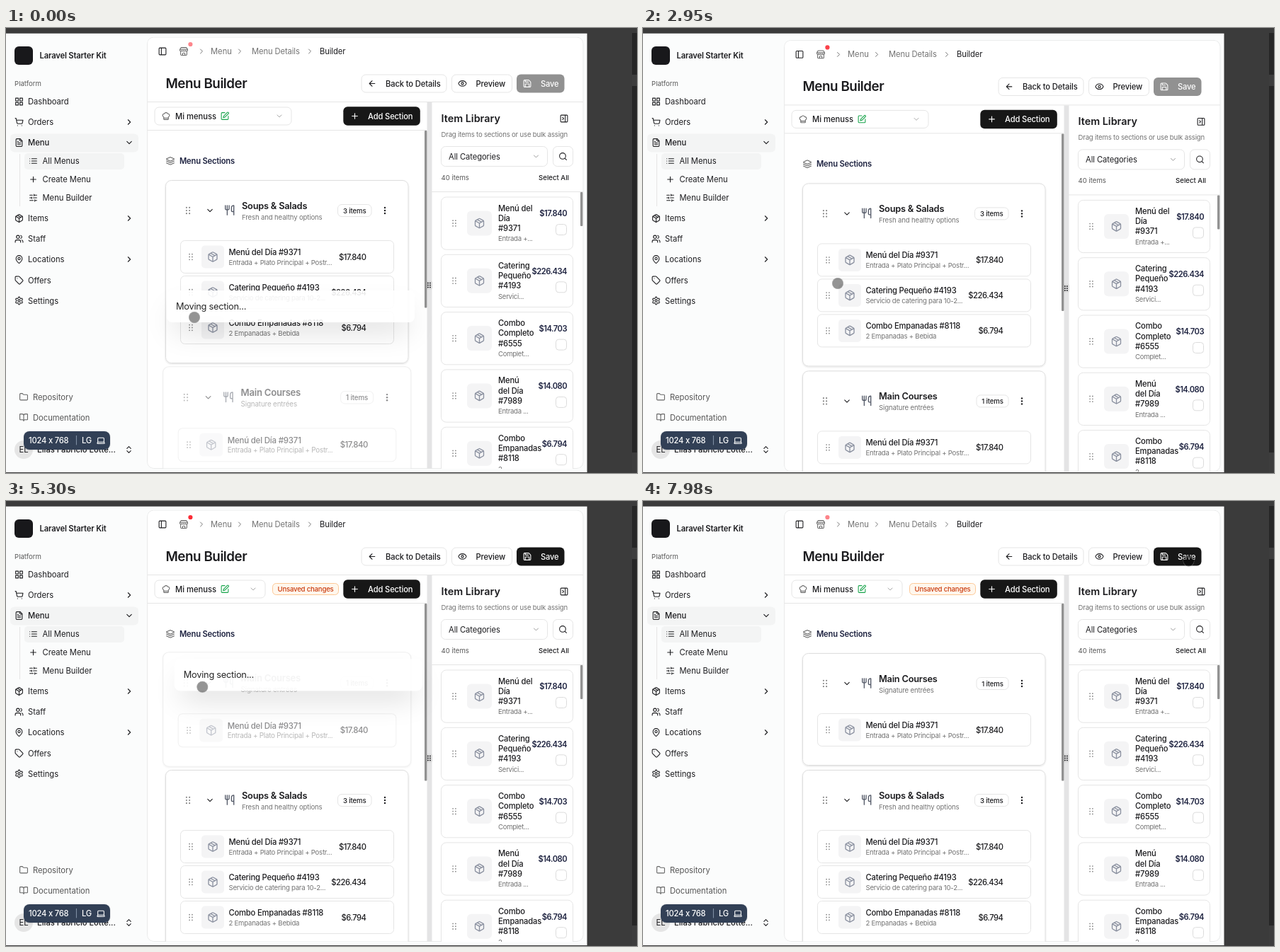
Animation, 891 px wide and 629 px high, one loop 8000 ms. Source, as an HTML page:

```html
<!DOCTYPE html>
<html lang="en">
<head>
<meta charset="utf-8">
<title>Menu Builder</title>
<style>
html, body { margin: 0; width: 100%; height: 100%; overflow: hidden; background: #3b3b3b; }
body { position: relative; font-family: Inter, "Open Sans", sans-serif; }
svg { position: absolute; left: 0; top: 0; display: block; }
text { white-space: pre; }
#overlay, #cursor { position: absolute; left: 0; top: 0; box-sizing: border-box; }
#overlay {
  width: 350px; height: 45px; padding: 0 13px; border-radius: 8px; line-height: 45px;
  font-size: 12.8px; letter-spacing: -.25px; color: #262626;
  background: rgba(255, 255, 255, .9); box-shadow: 0 20px 40px -10px rgba(0, 0, 0, .17);
}
#cursor {
  width: 15px; height: 15px; margin: -7.5px 0 0 -7.5px; border-radius: 50%;
  background: rgba(0, 0, 0, .42); box-shadow: 0 0 0 .5px rgba(120, 120, 120, .7);
}
</style>
</head>
<body>
<svg id="stage" width="891" height="629" viewBox="0 0 891 629"></svg>
<div id="overlay">Moving section...</div>
<div id="cursor"></div>
<script>
const INK = '#1c1c1f', MUTED = '#737373', LINE = '#e5e5e5', NAVY = '#1e2340';
const box = 'M5 3h14a2 2 0 0 1 2 2v14a2 2 0 0 1-2 2H5a2 2 0 0 1-2-2V5a2 2 0 0 1 2-2';
const hole = 'M15 12a3 3 0 1 1-6 0a3 3 0 0 1 6 0';
const ICONS = {
  grid: 'M3 3h7v7H3zM14 3h7v7h-7zM14 14h7v7h-7zM3 14h7v7H3z',
  cart: 'M8 21h.01M19 21h.01M2 2h2l2.7 12.4a2 2 0 0 0 2 1.6h9.8a2 2 0 0 0 2-1.6L22 7H5',
  file: 'M15 2H6a2 2 0 0 0-2 2v16a2 2 0 0 0 2 2h12a2 2 0 0 0 2-2V7zM14 2v4a2 2 0 0 0 2 2h4M10 9H8M16 13H8M16 17H8',
  list: 'M3 6h.01M3 12h.01M3 18h.01M8 6h13M8 12h13M8 18h13',
  plus: 'M5 12h14M12 5v14',
  sliders: 'M21 5h-7M10 5H3M21 12h-9M8 12H3M21 19h-5M12 19H3M14 3v4M8 10v4M16 17v4',
  pack: 'M11 21.7a2 2 0 0 0 2 0l7-4a2 2 0 0 0 1-1.7V8a2 2 0 0 0-1-1.7l-7-4a2 2 0 0 0-2 0l-7 4A2 2 0 0 0 3 8v8a2 2 0 0 0 1 1.7zM12 22V12M3.3 7 12 12l8.7-5M7.5 4.3l9 5.1',
  users: 'M16 21v-2a4 4 0 0 0-4-4H6a4 4 0 0 0-4 4v2M13 7a4 4 0 1 1-8 0a4 4 0 0 1 8 0M22 21v-2a4 4 0 0 0-3-3.9M16 3.1a4 4 0 0 1 0 7.8',
  pin: 'M20 10c0 5-5.5 10.2-7.4 11.8a1 1 0 0 1-1.2 0C9.5 20.2 4 15 4 10a8 8 0 0 1 16 0M15 10a3 3 0 1 1-6 0a3 3 0 0 1 6 0',
  tag: 'M12.6 2.6A2 2 0 0 0 11.2 2H4a2 2 0 0 0-2 2v7.2a2 2 0 0 0 .6 1.4l8.7 8.7a2.4 2.4 0 0 0 3.4 0l6.6-6.6a2.4 2.4 0 0 0 0-3.4zM7.5 7.5h.01',
  gear: hole + 'M12.2 2h-.4a2 2 0 0 0-2 2v.2a2 2 0 0 1-1 1.7l-.4.3a2 2 0 0 1-2 0l-.2-.1a2 2 0 0 0-2.7.7l-.2.4a2 2 0 0 0 .7 2.7l.2.1a2 2 0 0 1 1 1.7v.5a2 2 0 0 1-1 1.8l-.2.1a2 2 0 0 0-.7 2.7l.2.4a2 2 0 0 0 2.7.7l.2-.1a2 2 0 0 1 2 0l.4.3a2 2 0 0 1 1 1.7v.2a2 2 0 0 0 2 2h.4a2 2 0 0 0 2-2v-.2a2 2 0 0 1 1-1.7l.4-.3a2 2 0 0 1 2 0l.2.1a2 2 0 0 0 2.7-.7l.2-.4a2 2 0 0 0-.7-2.7l-.2-.1a2 2 0 0 1-1-1.7v-.5a2 2 0 0 1 1-1.8l.2-.1a2 2 0 0 0 .7-2.7l-.2-.4a2 2 0 0 0-2.7-.7l-.2.1a2 2 0 0 1-2 0l-.4-.3a2 2 0 0 1-1-1.7V4a2 2 0 0 0-2-2z',
  folder: 'M20 20a2 2 0 0 0 2-2V8a2 2 0 0 0-2-2h-7.9a2 2 0 0 1-1.7-.9L9.6 3.9A2 2 0 0 0 7.9 3H4a2 2 0 0 0-2 2v13a2 2 0 0 0 2 2z',
  book: 'M12 7v14M3 18a1 1 0 0 1-1-1V4a1 1 0 0 1 1-1h5a4 4 0 0 1 4 4 4 4 0 0 1 4-4h5a1 1 0 0 1 1 1v13a1 1 0 0 1-1 1h-6a3 3 0 0 0-3 3 3 3 0 0 0-3-3z',
  right: 'm9 18 6-6-6-6',
  down: 'm6 9 6 6 6-6',
  updown: 'm7 15 5 5 5-5M7 9l5-5 5 5',
  panel: box + 'M9 3v18',
  dock: box + 'M15 3v18M8 9l3 3-3 3',
  store: 'M2 7l2.6-4.4A1.2 1.2 0 0 1 6 2h12a1.2 1.2 0 0 1 1.2.6L22 7zM4 12v8a2 2 0 0 0 2 2h12a2 2 0 0 0 2-2v-8M15 22v-4a2 2 0 0 0-2-2h-2a2 2 0 0 0-2 2v4M2 7v3a2.7 2.7 0 0 0 5 0a2.7 2.7 0 0 0 5 0a2.7 2.7 0 0 0 5 0a2.7 2.7 0 0 0 5 0V7',
  back: 'm12 19-7-7 7-7M19 12H5',
  eye: hole + 'M2 12.3a1 1 0 0 1 0-.7 10.8 10.8 0 0 1 20 0 1 1 0 0 1 0 .7 10.8 10.8 0 0 1-20 0',
  save: 'M15.2 3a2 2 0 0 1 1.4.6l3.8 3.8a2 2 0 0 1 .6 1.4V19a2 2 0 0 1-2 2H5a2 2 0 0 1-2-2V5a2 2 0 0 1 2-2zM17 21v-7a1 1 0 0 0-1-1H8a1 1 0 0 0-1 1v7M7 3v4a1 1 0 0 0 1 1h7',
  chef: 'M17 21a1 1 0 0 0 1-1v-5.4c0-.4.3-.8.7-1a4 4 0 0 0-2.1-7.6 5 5 0 0 0-9.2 0 4 4 0 0 0-2.1 7.6c.4.2.7.6.7 1V20a1 1 0 0 0 1 1zM6 17h12',
  edit: 'M12 3H5a2 2 0 0 0-2 2v14a2 2 0 0 0 2 2h14a2 2 0 0 0 2-2v-7M18.4 2.6a2.1 2.1 0 0 1 3 3L12.4 14.6l-4.4 1.4 1.4-4.4z',
  layers: 'M12.8 2.2a2 2 0 0 0-1.6 0L2.6 6.1a1 1 0 0 0 0 1.8l8.6 3.9a2 2 0 0 0 1.6 0l8.6-3.9a1 1 0 0 0 0-1.8zM2 12l9.2 4.2a2 2 0 0 0 1.6 0L22 12M2 17l9.2 4.2a2 2 0 0 0 1.6 0L22 17',
  fork: 'M3 2v7a2 2 0 0 0 2 2h4a2 2 0 0 0 2-2V2M7 2v20M21 15V2a5 5 0 0 0-5 5v6a2 2 0 0 0 2 2h3zm0 0v7',
  search: 'M19 11a8 8 0 1 1-16 0a8 8 0 0 1 16 0M21 21l-4.3-4.3',
  laptop: 'M20 16V7a2 2 0 0 0-2-2H6a2 2 0 0 0-2 2v9m16 0H4m16 0 1.3 2.6a1 1 0 0 1-.9 1.4H3.6a1 1 0 0 1-.9-1.4L4 16'
};

const icon = (name, cx, cy, size = 13, color = INK, w = 2) =>
  `<path d="${ICONS[name]}" transform="translate(${cx - size / 2} ${cy - size / 2}) scale(${size / 24})" fill="none" stroke="${color}" stroke-width="${w}" stroke-linecap="round" stroke-linejoin="round"/>`;
const rect = (x, y, w, h, r, fill, stroke = 'none', extra = '') =>
  `<rect x="${x}" y="${y}" width="${w}" height="${h}" rx="${r}" fill="${fill}" stroke="${stroke}" ${extra}/>`;
const text = (x, y, s, size = 11.2, weight = 400, color = INK, ls = 0, anchor = 'start') =>
  `<text x="${x}" y="${y}" font-size="${size}" font-weight="${weight}" fill="${color}" letter-spacing="${ls}" text-anchor="${anchor}">${s.replace('&', '&amp;')}</text>`;
const small = (x, y, s, ls = -.14) => text(x, y, s, 9.6, 400, MUTED, ls);
const group = (id, body, extra = '') => `<g id="${id}" ${extra}>${body}</g>`;
const grip = (cx, cy, gap = 4, r = 1, color = '#8a8a8a') => {
  let out = '';
  for (let i = 0; i < 6; i++)
    out += `<circle cx="${cx + (i % 2 - .5) * gap}" cy="${cy + ((i >> 1) - 1) * gap}" r="${r}" fill="${color}"/>`;
  return out;
};

function sidebar() {
  const rows = [['grid', 'Dashboard', 104], ['cart', 'Orders', 133, 'right'], ['file', 'Menu', 162, 'down'],
    ['pack', 'Items', 269, 'right'], ['users', 'Staff', 298], ['pin', 'Locations', 327, 'right'],
    ['tag', 'Offers', 356.5], ['gear', 'Settings', 385.5]];
  const subs = [['list', 'All Menus', 188], ['plus', 'Create Menu', 214], ['sliders', 'Menu Builder', 240]];
  return rect(12, 26, 26, 26, 6, '#18181b') +
    text(47.5, 43, 'Laravel Starter Kit', 11.2, 600, INK, -.15) +
    text(12, 81.5, 'Platform', 9.6, 400, '#5a5a5a') +
    rect(6, 149.5, 181, 26, 6, '#f3f4f4') + rect(26, 177, 141, 23, 5, '#f3f4f4') +
    `<path d="M19.5 178V252" stroke="${LINE}"/>` +
    rows.map(([ic, s, y, ch]) => icon(ic, 18.5, y) +
      text(31, y + 4, s, 11.2, s === 'Menu' ? 500 : 400) + (ch ? icon(ch, 174, y) : '')).join('') +
    subs.map(([ic, s, y]) => icon(ic, 38.5, y) + text(51.5, y + 4, s)).join('') +
    icon('folder', 25, 521.5, 13, '#666') + text(38, 525.5, 'Repository', 11.2, 400, '#555') +
    icon('book', 25, 550.5, 13, '#666') + text(38, 554.5, 'Documentation', 11.2, 400, '#555') +
    `<circle cx="25" cy="596" r="13" fill="#e5e5e5"/>` + text(25, 600, 'EL', 11.2, 400, INK, 0, 'middle') +
    text(44, 600, 'Elias Fabricio Lotte...', 11.2, 500) + icon('updown', 173.5, 596) +
    rect(25, 570, 122, 26, 8, '#334056', 'none', 'filter="url(#soft)"') +
    text(32, 587, '1024 x 768', 11.2, 500, '#fff', -.2) + text(97.5, 586.5, '|', 11.2, 400, '#94a3b8') +
    text(107, 587, 'LG', 11.2, 500, '#fff', -.2) + icon('laptop', 134, 583, 13, '#fff');
}

const button = (x, w, ic, s, tx) => rect(x, 66, w, 25, 6, '#fff', LINE) +
  icon(ic, x + 15, 78.5) + text(tx, 82.5, s, 11.2, 500, INK, -.12);

function header() {
  return icon('panel', 221, 33) + icon('store', 251, 33, 13, '#666') +
    `<circle id="dot" cx="260.4" cy="23" r="3.1" fill="#fb2c36"/>` +
    [276, 330, 429].map(x => icon('right', x, 33, 12, '#777')).join('') +
    text(289, 37, 'Menu', 11.2, 400, MUTED) + text(347, 37, 'Menu Details', 11.2, 400, MUTED, -.1) +
    text(443, 37, 'Builder', 11.2, 400, INK, -.1) +
    text(225.5, 85, 'Menu Builder', 18.8, 600, INK, -.45) +
    button(502, 120, 'back', 'Back to Details', 536) + button(629.5, 85, 'eye', 'Preview', 663.5) +
    group('save', rect(721, 65.5, 67.5, 26, 6, '#171717') + icon('save', 736, 78.5, 13, '#fff') +
      text(755, 82.5, 'Save', 11.2, 500, '#fff', -.2)) +
    `<path d="M200 104.5H815M200 144.5H594" stroke="${LINE}"/>`;
}

function toolbar() {
  return rect(210, 112, 193, 25, 6, '#fff', LINE, 'id="picker"') +
    icon('chef', 226, 124.5, 13, '#666') + text(239, 128.5, 'Mi menuss', 11.2, 500) +
    icon('edit', 309, 124.5, 13, '#16a34a') +
    group('arrow', icon('down', 386, 124.5, 12, '#aaa')) +
    group('unsaved', rect(376.5, 116.5, 93, 16, 5, '#fff7ed', '#fdc896') +
      text(383.5, 128, 'Unsaved changes', 9.6, 500, '#ca3a0c', -.2)) +
    rect(476.3, 111.3, 108.5, 26.5, 6, '#171717') + icon('plus', 492.5, 124.5, 13, '#fff') +
    text(511, 128.5, 'Add Section', 11.2, 500, '#fff', -.15);
}

function section(id, title, sub, items) {
  const h = 58.5 + items.length * 50 + 50, bx = items.length > 1 ? 468.5 : 471;
  return group(id, rect(225.5, .5, 342.5, h - .5, 8, '#fff', '#dedede', 'filter="url(#soft)"') +
    grip(257, 43, 4.2, 1.1) + icon('down', 288, 43, 13) + icon('fork', 315.7, 42.5, 16, '#525866') +
    text(333, 41, title, 12.8, 600, INK, -.22) + small(333, 56, sub) +
    rect(bx, 34.5, 516 - bx, 17, 5.5, '#fff', LINE) +
    text((bx + 516) / 2, 46.5, items.length + ' items', 9.6, 500, INK, -.15, 'middle') +
    [-4, 0, 4].map(d => `<circle cx="535" cy="${43 + d}" r="1.2" fill="${INK}"/>`).join('') +
    items.map(([name, desc, price], i) => {
      const y = 108.5 + i * 50;
      return rect(246.5, y - 23, 301, 46, 6, '#fff', LINE) + grip(261, y, 3.8, .9) +
        rect(276, y - 16, 32, 32, 5, '#f4f4f5') + icon('pack', 292, y, 16, '#8b91a0') +
        text(314.5, y - 2.5, name, 11.2, 500, INK, -.18) + small(314.5, y + 11, desc, -.24) +
        text(508.5, y + 4, price, 11.2, 500, INK, -.45, 'end');
    }).join(''));
}

function library() {
  const cards = [['Menú del|Día|#9371', 'Entrada +...', '$17.840'], ['Catering|Pequeño|#4193', 'Servici...', '$226.434'],
    ['Combo|Completo|#6555', 'Complet...', '$14.703'], ['Menú|del Día|#7989', 'Entrada ...', '$14.080'],
    ['Combo|Empanadas|#8118', '2 ...', '$6.794']];
  return rect(594.5, 105, 7, 518, 0, '#e4e4e5') + rect(593.5, 358, 8, 11, 2, '#e5e5e5', '#d6d6d6') +
    grip(597.4, 363.6, 3, 1, INK) + rect(591, 145, 3.4, 250.5, 1, '#929292') +
    text(614.5, 133, 'Item Library', 14.4, 600) + icon('dock', 788, 128, 13) +
    small(614.5, 153.5, 'Drag items to sections or use bulk assign', -.19) +
    rect(614.5, 167.5, 150, 28, 6, '#fff', LINE) + text(625, 185.5, 'All Categories', 11.2, 400, INK, -.08) +
    icon('down', 748.5, 181.5, 12, '#999') +
    rect(772.5, 167.5, 28, 28, 6, '#fff', LINE) + icon('search', 786.5, 181.5) +
    text(614.5, 215, '40 items', 9.6, 400, '#555') + text(795, 215, 'Select All', 9.6, 500, INK, 0, 'end') +
    `<path d="M601 231.5H815" stroke="${LINE}"/>` + rect(811, 232, 3.4, 48, 1, '#929292') +
    cards.map(([name, desc, price], i) => {
      const y = 276 + i * 81.3;
      return rect(614.5, y - 37, 186, 74.2, 7, '#fff', LINE) + grip(633, y, 3.8, .9) +
        rect(651, y - 17.5, 35, 35, 6, '#f4f4f5') + icon('pack', 668.5, y, 16, '#8b91a0') +
        name.split('|').map((s, k) => text(695, y - 17.5 + k * 14.2, s, 11.2, 500, INK, -.15)).join('') +
        small(695, y + 25.3, desc, -.3) + text(792, y - 9.7, price, 11.2, 600, NAVY, -.52, 'end') +
        rect(776.5, y + 1.5, 15, 15, 4, '#fff', '#dcdcdc');
    }).join('');
}

const menu = ['Menú del Día #9371', 'Entrada + Plato Principal + Postr...', '$17.840'];
const $ = id => document.getElementById(id);
$('stage').innerHTML =
  `<defs><clipPath id="pane">${rect(199, 12.5, 617, 610.5, 9, '#fff')}</clipPath>
  <clipPath id="list">${rect(200, 145, 391, 477.5, 0, '#fff')}</clipPath>
  <filter id="soft" x="-5%" y="-5%" width="110%" height="130%"><feDropShadow dx="0" dy="1" stdDeviation="1" flood-opacity=".12"/></filter></defs>` +
  rect(884, 7, 7, 622, 0, '#262626') + rect(884, 66, 7, 16, 0, '#3d3d3d') + rect(884, 600, 7, 29, 0, '#3d3d3d') +
  rect(0, 7.7, 820.5, 620.3, 0, '#fbfcfc') + sidebar() +
  group('main', rect(199.5, 13, 615.5, 609.5, 9, '#fff', '#e9eaea') + header() + toolbar() +
    icon('layers', 232, 188, 13, '#666') + text(245, 192, 'Menu Sections', 11.2, 600, NAVY, -.2) +
    group('cards', section('soups', 'Soups & Salads', 'Fresh and healthy options', [menu,
      ['Catering Pequeño #4193', 'Servicio de catering para 10-2...', '$226.434'],
      ['Combo Empanadas #8118', '2 Empanadas + Bebida', '$6.794']]) +
      section('mains', 'Main Courses', 'Signature entrées', [menu]), 'clip-path="url(#list)"') +
    library(), 'clip-path="url(#pane)"');

// Rows of [ms, x, y]; equal neighbours hold, others ease.
const CURSOR = [[0, 265.5, 408.5], [120, 265.5, 408.5], [560, 272.6, 324], [1599, 272.6, 324], [1600, 278, 260.5],
  [2610, 278, 260.5], [2950, 274.5, 360.5], [3170, 274.5, 360.5], [3550, 252.5, 510.5], [3780, 252, 512],
  [4070, 252, 512], [4370, 259, 432], [4540, 259, 432], [4660, 263, 408], [4930, 276, 262], [5220, 276, 262],
  [6000, 302.5, 271.5], [6250, 330, 244], [6500, 380, 314], [6810, 448, 278], [6840, 448, 278], [7590, 770, 84], [8000, 770, 84]];
const OVERLAY = [[0, 227, 371], [120, 227, 371], [560, 235, 287], [1600, 235, 287], [1720, 240, 223], [2610, 240, 223],
  [2860, 225, 480], [4070, 225, 480], [4370, 234, 415], [4540, 234, 415], [4660, 240, 394], [4930, 242, 226],
  [5220, 242, 226], [5470, 225, 215], [8000, 225, 215]];
const PULL = [[0, 0, 0], [2680, 0, 0], [2900, 0, 4.4], [3170, 0, 4.4], [3420, 0, 0], [8000, 0, 0]];
const LOOP = 8000, TOP = 215, GAP = 6.5;

function at(rows, t) {
  const i = rows.findIndex(r => r[0] > t), a = rows[i - 1], b = rows[i];
  const p = (t - a[0]) / (b[0] - a[0]), e = p * p * (3 - 2 * p);
  return [a[1] + (b[1] - a[1]) * e, a[2] + (b[2] - a[2]) * e];
}
const move = (el, [x, y]) => { el.style.transform = `translate(${x}px, ${y}px)`; };

function draw(now) {
  const t = now % LOOP;
  const drag = t < 2860 || (t >= 3920 && t < 5470), swapped = t >= 5250;
  move($('cursor'), at(CURSOR, t));
  move($('overlay'), at(OVERLAY, t));
  $('overlay').style.visibility = drag ? 'visible' : 'hidden';
  $('main').setAttribute('transform', `translate(0 ${at(PULL, t)[1]})`);
  const mainsY = swapped ? TOP : TOP + 258.5 + GAP, k = drag ? 1.022 : 1;
  $('soups').setAttribute('transform', `translate(0 ${swapped ? TOP + 158.5 + GAP : TOP})`);
  $('mains').setAttribute('transform', `translate(397 ${mainsY + 79}) scale(${k}) translate(-397 -79)`);
  $('mains').setAttribute('opacity', drag ? .5 : 1);
  $('save').setAttribute('opacity', swapped ? 1 : .47);
  $('unsaved').setAttribute('visibility', swapped ? 'visible' : 'hidden');
  $('picker').setAttribute('width', swapped ? 156 : 193);
  $('arrow').setAttribute('transform', `translate(${swapped ? -37 : 0} 0)`);
  $('dot').setAttribute('opacity', .75 + .25 * Math.cos(Math.PI * (t / 1000 - 1.25)));
}
const start = performance.now();
(function tick() {
  draw(performance.now() - start);
  requestAnimationFrame(tick);
})();
</script>
</body>
</html>
```
